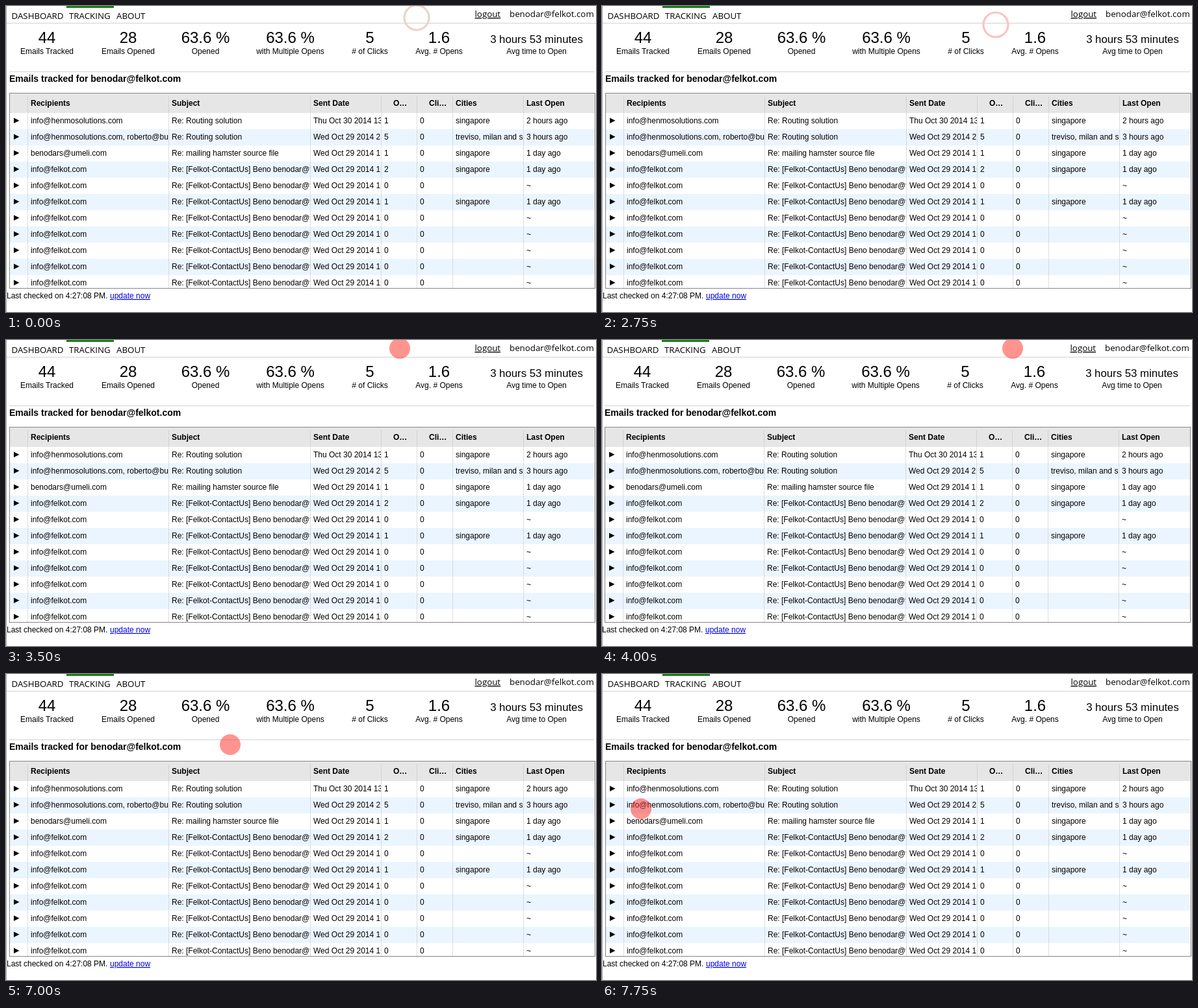
Recreate the animation shown at these times as an HTML page. Size 908 px wide and 472 px high, loop 8 s.

```html
<!DOCTYPE html>
<html lang="en">
<head>
<meta charset="utf-8">
<title>Email tracking</title>
<style>
  html, body { margin: 0; width: 100%; height: 100%; overflow: hidden; background: #fff; }
  svg { display: block; }
  text { font: 12px "Liberation Sans", Arial, sans-serif; fill: #000; white-space: pre; }
  .nav { font: 13.3px "Open Sans", "Noto Sans", sans-serif; }
  .big { font-size: 24px; }
  .mid { font-size: 16.8px; }
  .title { font-size: 14px; font-weight: bold; }
  .head { font-weight: bold; }
  .mc { text-anchor: middle; }
  .link { text-decoration: underline; }
  .blue { fill: #0000e6; }
</style>
</head>
<body>
<svg id="stage" width="908" height="472" viewBox="0 0 908 472">
  <rect width="908" height="472" fill="#fff"/>
  <g id="page"></g>
  <path d="M.5 0V472" stroke="#a8a8a8"/>
  <circle id="pointer"/>
</svg>
<script>
const NS = "http://www.w3.org/2000/svg";
const page = document.getElementById("page");
const pointer = document.getElementById("pointer");

function add(parent, tag, attrs, content) {
  const el = document.createElementNS(NS, tag);
  for (const key in attrs) el.setAttribute(key, attrs[key]);
  if (content !== undefined) el.textContent = content;
  parent.appendChild(el);
  return el;
}
const label = (x, y, str, cls = "", parent = page) =>
  add(parent, "text", { x, y, class: cls }, str);
const rect = (x, y, width, height, fill, parent = page) =>
  add(parent, "rect", { x, y, width, height, fill });

// Top bar
rect(93, 0, 73, 3, "#187f18");
rect(0, 26, 908, 1, "#d2d2d2");
label(8.5, 20, "DASHBOARD", "nav");
label(97, 20, "TRACKING", "nav");
label(170, 20, "ABOUT", "nav");
label(721.5, 17, "logout", "nav link");
label(775, 17, "benodar@felkot.com", "nav");

// Figures
const stats = [
  [63, "44", "Emails Tracked"],
  [188, "28", "Emails Opened"],
  [307, "63.6 %", "Opened"],
  [437.5, "63.6 %", "with Multiple Opens"],
  [560, "5", "# of Clicks"],
  [666.5, "1.6", "Avg. # Opens"],
  [816.5, "3 hours 53 minutes", "Avg time to Open"]
];
for (const [x, value, name] of stats) {
  label(x, 57, value, value.length > 6 ? "mid mc" : "big mc");
  label(x, 74, name, "mc");
}
rect(5, 101, 900, 1, "#d2d2d2");
label(5, 117, "Emails tracked for benodar@felkot.com", "title");

// Table
const edges = [33, 250, 468, 577, 632, 687, 796, 906];
const heads = ["Recipients", "Subject", "Sent Date", "O…", "Cli…", "Cities", "Last Open"];
const contact = "Re: [Felkot-ContactUs] Beno benodar@felkot.com";
const day = "Wed Oct 29 2014 ";
const row = (city = "", opened = "~", opens = "0") =>
  ["info@felkot.com", contact, day + "16:20", opens, "0", city, opened];
const rows = [
  ["info@henmosolutions.com", "Re: Routing solution", "Thu Oct 30 2014 13:05", "1", "0", "singapore", "2 hours ago"],
  ["info@henmosolutions.com, roberto@bunelo.com", "Re: Routing solution", day + "21:14", "5", "0", "treviso, milan and singapore", "3 hours ago"],
  ["benodars@umeli.com", "Re: mailing hamster source file", day + "16:48", "1", "0", "singapore", "1 day ago"],
  row("singapore", "1 day ago", "2"),
  row(),
  row("singapore", "1 day ago", "1"),
  row(), row(), row(), row(), row()
];

const table = add(page, "svg", { x: 0, y: 135, width: 906, height: 300, viewBox: "0 135 906 300" });
rect(6, 135, 900, 30, "#e6e6e6", table);
rows.forEach((_, i) => {
  const y = 165 + i * 25;
  if (i % 2) rect(6, y, 900, 25, "#ebf5ff", table);
  add(table, "path", { d: `M12 ${y + 7.5}l8.5 4.2l-8.5 4.3z` });
});
edges.slice(0, -1).forEach((x, c) => {
  add(table, "path", { d: `M${x + .5} 140V435`, stroke: "#bdbdbd", "stroke-dasharray": "1 1" });
  const width = edges[c + 1] - x;
  const cell = add(table, "svg", { x, y: 135, width, height: 300, viewBox: `0 135 ${width} 300` });
  label(c === 3 || c === 4 ? 19 : 5, 154, heads[c], "head", cell);
  rows.forEach((r, i) => label(5, 181 + i * 25, r[c], "", cell));
});
add(page, "rect", { x: 5.5, y: 134.5, width: 901, height: 301, fill: "none", stroke: "#868686" });

// Footer
label(1, 451, "Last checked on 4:27:08 PM.");
label(160, 451, "update now", "link blue");

// Pointer steps: time, x, y, then ring colour while a click fades
const steps = [
  [0, 632, 18, "#ecd2cc"],
  [250, 600, 40],
  [500, 606, 29, "#fbc9c6"],
  [750, 606, 13],
  [2750, 606, 29, "#fcc3c0"],
  [3000, 606, 29, "#fbc9c6"],
  [3250, 606, 29, "#f6cfcb"],
  [3500, 606, 13],
  [4000, 632, 13],
  [6750, 599, 25],
  [7000, 345, 109],
  [7250, 232, 171],
  [7500, 143, 197],
  [7750, 60, 208]
];

function draw(t) {
  const [, x, y, ring] = steps.findLast(s => s[0] <= t);
  const look = {
    cx: x, cy: y, r: ring ? 19 : 16,
    fill: ring ? "none" : "#ff2a20", "fill-opacity": .5,
    stroke: ring || "none", "stroke-width": 3.2
  };
  for (const key in look) pointer.setAttribute(key, look[key]);
  page.setAttribute("transform", `translate(${t >= 4000 && t < 7000 ? -1 : 0} 0)`);
}

const start = performance.now();
function tick() {
  draw((performance.now() - start) % 8000);
  requestAnimationFrame(tick);
}
tick();
</script>
</body>
</html>
```
